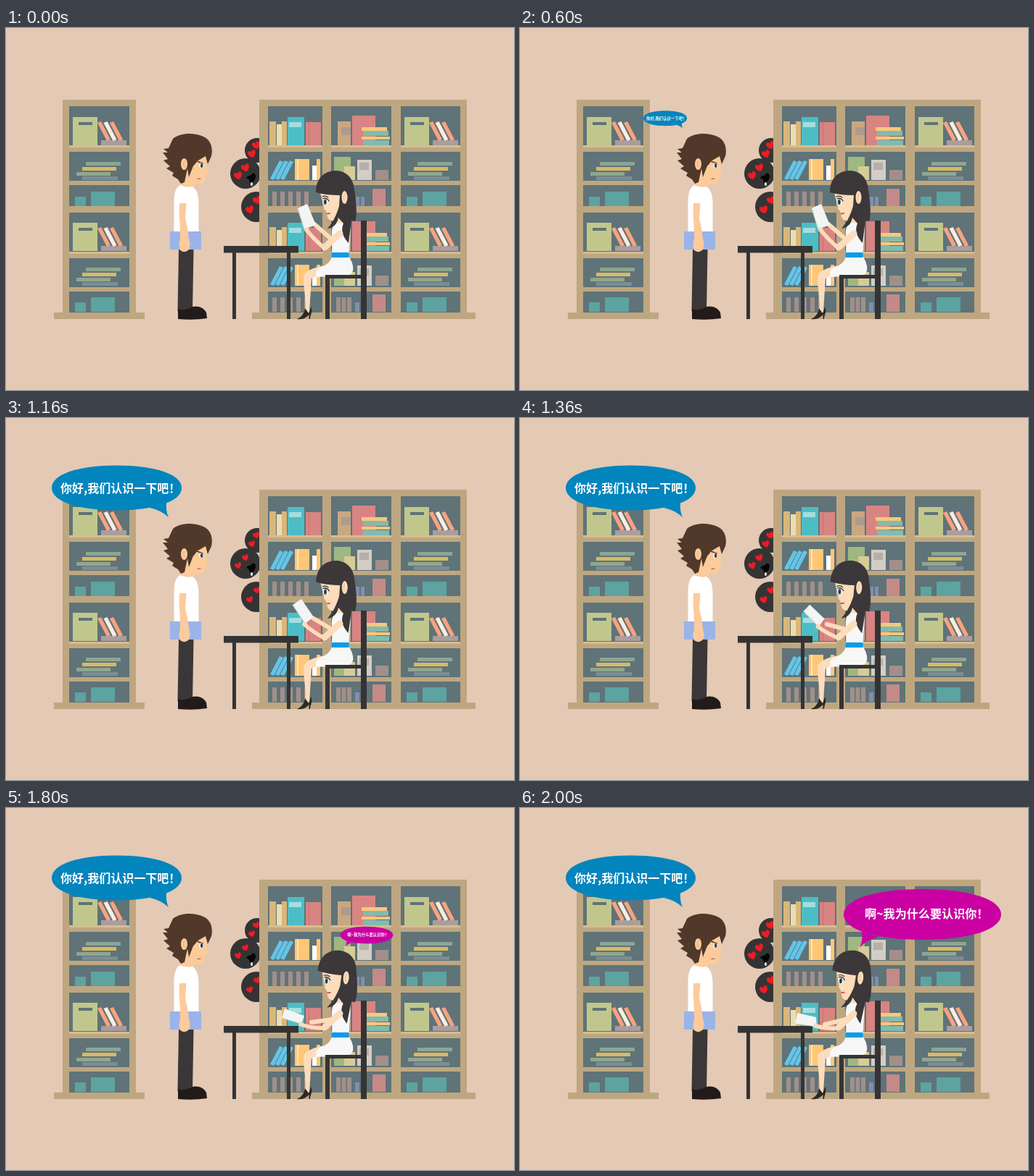
Animation, 700 px wide and 500 px high, one loop 2.92 s. Source, as an HTML page:

```html
<!DOCTYPE html>
<html lang="zh">
<head>
<meta charset="utf-8">
<title>Library</title>
<style>
html, body { margin: 0; width: 100%; height: 100%; overflow: hidden; background: #e4c9b4; }
svg { display: block; width: 100%; height: 100%; }
text { font-family: "Noto Sans CJK SC", "Noto Sans CJK", sans-serif; font-weight: 700; fill: #fff; }
</style>
</head>
<body>
<svg id="stage" viewBox="0 0 700 500"></svg>
<script>
const LOOP = 2920, STEP = 40;
const WOOD = '#bea780', EDGE = '#d6bd91', BACK = '#5f7378', DARK = '#353434';
const SKIN = '#fccb9b', PALE = '#fcdcba', HAIR = '#3c3738', BROWN = '#50382a';
const TEAL = '#5ca3a1', PINK = '#d88483', ORANGE = '#fdc67b', SALMON = '#f9a27f', GREY = '#a28f89';

const box = (x1, y1, x2, y2, c) =>
  `<rect x="${x1}" y="${y1}" width="${x2 - x1}" height="${y2 - y1}" fill="${c}"/>`;
const shape = (d, c, more = '') => `<path d="${d}" fill="${c}" ${more}/>`;
const line = (d, c, w, id = '') =>
  `<path ${id && `id="${id}"`} d="${d}" fill="none" stroke="${c}" stroke-width="${w}" stroke-linecap="round" stroke-linejoin="round"/>`;
const oval = (x, y, rx, ry, c, more = '') =>
  `<ellipse cx="${x}" cy="${y}" rx="${rx}" ry="${ry}" fill="${c}" ${more}/>`;
const group = (content, attrs) => `<g ${attrs}>${content}</g>`;
const boxes = list => list.map(b => box(...b)).join('');
// Leaning books: a slanted strip repeated sideways
const leaning = (x, y, dx, dy, w, gap, colors) => colors.map((c, i) =>
  shape(`M${x + i * gap} ${y}l${w} ${dx > 0 ? -2 : 2} ${dx} ${dy} ${-w} ${dx > 0 ? 2 : -2}Z`, c)).join('');

// Contents of the upper half of each kind of column
const sideBooks = boxes([
  [92, 123, 126, 162, '#c1c78c'], [100, 130, 119, 134, BACK], [131, 155, 166, 162, '#a89d9f'],
  [110, 185, 158, 190, '#8aa694'], [105, 192, 152, 197, '#d9b865'],
  [97, 199, 144, 204, '#8fa791'], [105, 205, 154, 210, '#7b8e92'],
  [95, 233, 110, 246, TEAL], [117, 226, 150, 246, TEAL]
]) + leaning(126, 131, 13, 25, 5, 8.5, [SALMON, '#fcece0', SALMON]);

const leftBooks = boxes([
  [363, 129, 372, 162, '#d9b77b'], [373, 133, 380, 162, '#efdcae'], [380, 129, 387, 162, '#d9b77b'],
  [388, 123, 411, 162, '#4dbdc5'], [390, 130, 407, 137, '#a5dde0'],
  [413, 130, 434, 162, PINK], [417, 130, 418, 162, '#c57375'],
  [398, 181, 418, 210, '#fec777'], [401, 181, 403, 210, '#ffe3b5'],
  [422, 190, 428, 210, '#fff'], [428, 181, 433, 210, '#fec777'],
  ...[0, 1, 2, 3, 4].map(i => [367 + i * 11, 226, 373 + i * 11, 246, GREY])
]) + leaning(377, 183, -13, 25, 5, 7, ['#63c5e9', '#63c5e9', '#63c5e9']);

const midBooks = boxes([
  [457, 129, 475, 162, '#c9a780'], [462, 137, 475, 148, '#ad9b8e'], [477, 121, 509, 162, PINK],
  [490, 137, 525, 142, ORANGE], [492, 142, 527, 149, '#80bcae'],
  [490, 150, 529, 154, ORANGE], [492, 155, 528, 162, '#80bcae'],
  [452, 178, 475, 210, '#9fb780'], [466, 191, 481, 210, '#d5cc96'],
  [484, 182, 504, 210, '#d3cdc5'], [487, 186, 500, 196, '#b6afa9'], [509, 196, 527, 210, GREY],
  ...[0, 1, 2].map(i => [455 + i * 7.5, 226, 461 + i * 7.5, 246, GREY]),
  [481, 233, 487, 246, '#818eaf'], [489, 233, 494, 246, '#818eaf'],
  [505, 222, 523, 246, '#c48a87']
]);

function column(x1, x2, books, shift = 0) {
  const rows = [[108, 162], [171, 211], [217, 246]];
  let out = '';
  for (const dy of [0, 147]) {
    for (const [a, b] of rows) out += box(x1, a + dy, x2, b + dy, BACK);
    out += box(x1, 162 + dy, x2, 165 + dy, EDGE);
    out += group(books, `transform="translate(${shift} ${dy && 146})"`);
  }
  return out;
}
const cabinet = (x1, x2, b1, b2) => box(x1, 99, x2, 394, WOOD) + box(b1, 393, b2, 402, WOOD);

const heart = (x, y) => group(
  shape('M0 5.5C-8 0-6-5-3-5C-1-5 0-3 0-2C0-3 1-5 3-5C6-5 8 0 0 5.5Z', '#ed1c24', 'class="heart"'),
  `transform="translate(${x} ${y}) rotate(-18)"`);
const monsters = oval(346, 169, 17, 17, DARK) + oval(330, 201, 21, 21, DARK) + oval(345, 247, 21, 21, DARK)
  + heart(345, 162) + heart(339, 174) + heart(330, 193) + heart(320, 204) + heart(346, 238) + heart(336, 251)
  + shape('M331 207C334 203 336 204 338 203C340 199 343 200 344 204C344 210 340 214 336 214C336 210 334 208 331 207Z', '#050505')
  + oval(338.5, 215.5, 1.4, 2.5, '#fff');

const boy =
  shape('M250 177L276 174L276 190L278 201C278 203 275 203 275 205L274 210C272 215 266 217 261 215L257 222L238 221L242 204Z', SKIN)
  + shape('M230 153C240 144 262 144 274 151C284 157 285 169 283 177L278 188L275 177L263 184C260 190 259 188 257 193L252 206L250 194L246 213L241 215L237 209L229 204L231 200L221 194L226 191L217 183L223 181L216 172L223 172L217 167L224 166Z', BROWN)
  + oval(245.5, 188, 4.5, 8, SKIN)
  + line('M246 184q-3 3 0 8', '#e5a878', 1)
  + line('M263 184L271 187', BROWN, 1.6)
  + oval(269, 190, 2.6, 3.6, '#fff') + oval(269.6, 190, 1.7, 3, '#28455f')
  + line('M264 208.5L268 208', '#a24b3f', 1.2)
  + shape('M238 306H258.5L257 391H236.5Z', '#3b3738')
  + shape('M237 388C243 391 251 388 257 385C264 383 273 386 276 393L277 401Q257 404 237 402Z', '#231b1a')
  + shape('M240 217Q250 221 257 219Q265 224 265.5 240V282H231.5V238Q232 221 240 217Z', '#fff')
  + box(226, 281, 269, 306, '#9ab4e8')
  + shape('M239 242H248.5L247 263Q251 277 252 291Q255 301 252 306Q247 312 240 307Q237 300 240 292Q240 271 238.5 257Z', SKIN);

const girlBody =
  shape('M438 328C424 331 412 335 410 343C410 360 414 378 412 393L418 393C419 376 420 361 421 346L432 341Z', PALE)
  + shape('M401 402C406 400 411 395 412 387L417 394L420.5 385C423 392 419 397 419 402L417.5 402L417.5 396C413 400 410 403 401 402Z', '#2d2828')
  + shape('M450 256L466 256L468 275L450 272Z', PALE)
  + shape('M452 268Q463 271 474 268C476 285 472 299 473 311H449C450 300 448 286 449 279Z', '#f7f7f7')
  + shape('M449 316H473Q481 330 477 338Q474 342 466 342L427 344Q426 334 432 331Q446 327 449 316Z', '#f7f7f7')
  + box(448.5, 310, 472.5, 317, '#0b9be9');

const girlHead =
  shape('M433 226L462 225L468 244L460 265L448 266C444 265 443 261 442 258L441 253L438 250C439 244 434 236 433 226Z', PALE)
  + shape('M427 227C427 208 438 197 455 197C471 198 479 209 480 224C483 240 484 258 481 267L476 266L472 297C464 288 461 280 465 270L458 262C456 272 450 276 443 277C451 268 456 257 459 246L460 231C450 231 438 230 427 227Z', HAIR)
  + oval(466.5, 234, 4, 9, PALE)
  + line('M467 229q-3 4-1 9', '#e6b995', 1)
  + line('M436 233Q440 231 444 234', HAIR, 1.2)
  + oval(440, 240, 3.6, 5, '#fff') + oval(439.8, 240.3, 2.2, 4, '#4a6d84') + oval(439.8, 240.5, 1, 2.4, '#202a30')
  + line('M437 235.5Q442 234 445 239', '#302b2b', 1.3)
  + line('M442.5 256.5L446 256', '#d9534e', 2);

const furniture = boxes([
  [312, 309, 317, 402, DARK], [387, 309, 392, 402, DARK], [300, 301, 403, 310.5, DARK],
  [489, 266, 497, 402, DARK], [440, 341, 446, 402, DARK], [441, 341, 490, 346, DARK]
]);

function balloon(id, cx, cy, rx, ry, tail, color, x, y, size, words) {
  const k = 0.6, a = rx * k, b = ry * k;
  const d = `M${cx - rx} ${cy}C${cx - rx} ${cy - b} ${cx - a} ${cy - ry} ${cx} ${cy - ry}`
    + `S${cx + rx} ${cy - b} ${cx + rx} ${cy}S${cx + a} ${cy + ry} ${cx} ${cy + ry}S${cx - rx} ${cy + b} ${cx - rx} ${cy}Z`;
  return group(shape(d, color) + shape(tail, color)
    + `<text x="${x}" y="${y}" font-size="${size}">${words}</text>`, `id="${id}"`);
}

const stage = document.getElementById('stage');
stage.innerHTML = box(0, 0, 700, 500, '#e4c9b4') + monsters
  + cabinet(78, 179, 66, 191) + column(87, 170, sideBooks)
  + cabinet(349, 635, 339, 647) + column(361, 436, leftBooks) + column(448, 531, midBooks) + column(544, 626, sideBooks, 457)
  + boy + girlBody + group(girlHead, 'id="head"') + furniture
  + line('', PALE, 6, 'farArm')
  + '<path id="book" fill="#f3f4f4"/>' + line('', '#c3d9c7', 1.2, 'spine')
  + line('M460 284L439 303', PALE, 9) + line('', PALE, 5.5, 'nearArm') + line('', PALE, 4, 'thumb')
  + balloon('hello', 152.5, 96.5, 89.5, 31, 'M198 124Q213 127 224 137Q220 129 221 116Z', '#0385bd', 75, 103, 16, '你好,我们认识一下吧！')
  + balloon('reply', 554.5, 147, 108.5, 35, 'M471 171Q473 182 468 193Q477 182 494 178Z', '#ca00a3', 475, 152, 16.1, '啊~我为什么要认识你！');

const el = id => document.getElementById(id);
const hearts = document.querySelectorAll('.heart');

// time, book corners (x, y) x 4, near hand, far hand, head tilt
const poses = [
  [960, 402, 249, 415, 243, 427, 272, 411, 278, 413, 279, 425, 271, 0],
  [1160, 395, 258, 407, 250, 424, 275, 412, 284, 410, 285, 424, 277, 0.4],
  [1520, 387, 274, 393, 264, 416, 279, 411, 292, 409, 291, 422, 291, 2.2],
  [1800, 380, 290, 384, 277, 411, 287, 407, 298, 405, 299, 421, 296, 4],
  [2000, 379, 298, 382, 283, 408, 289, 409, 302, 406, 301, 420, 299, 5]
];

function poseAt(t) {
  const last = poses.length - 1;
  if (t <= poses[0][0]) return poses[0];
  if (t >= poses[last][0]) return poses[last];
  const i = poses.findIndex(p => p[0] > t), a = poses[i - 1], b = poses[i];
  const u = (t - a[0]) / (b[0] - a[0]);
  return a.map((v, j) => v + (b[j] - v) * u);
}

function pop(id, t, start, x, y, drop) {
  const u = Math.min(1, Math.max(0, (t - start) / 400));
  const s = Math.max(0.03, u ** 2.14);
  const g = el(id);
  g.style.display = t < start ? 'none' : '';
  g.setAttribute('transform', `translate(${x} ${y + drop * (1 - s)}) scale(${s}) translate(${-x} ${-y})`);
}

function beat(t) {
  const active = t < 80 || (t >= 360 && t < 760) || (t >= 1000 && t < 2000);
  return active ? [1, 0.8, 0.9, 1][t / STEP % 4] : 1;
}

function draw(t) {
  const [, ax, ay, bx, by, cx, cy, dx, dy, nx, ny, fx, fy, tilt] = poseAt(t);
  const set = (id, d) => el(id).setAttribute('d', d);
  set('book', `M${ax} ${ay}L${bx} ${by}L${cx} ${cy}L${dx} ${dy}Z`);
  set('spine', `M${ax} ${ay}L${dx} ${dy}`);
  set('farArm', `M449 292L${fx} ${fy}`);
  set('nearArm', `M439 304Q${(nx + 439) / 2 + 1} ${(ny + 304) / 2 + 3} ${nx + 1} ${ny}`);
  set('thumb', `M${nx + 3} ${ny}L${nx + 1} ${ny - 2}`);
  el('head').setAttribute('transform', `rotate(${tilt} 460 265)`);
  const size = beat(t);
  hearts.forEach(h => h.setAttribute('transform', `scale(${size})`));
  pop('hello', t, 360, 224, 137, 2);
  pop('reply', t, 1560, 468, 193, -3);
}

function frame() {
  draw(Math.floor(performance.now() % LOOP / STEP) * STEP);
  requestAnimationFrame(frame);
}
frame();
</script>
</body>
</html>
```
